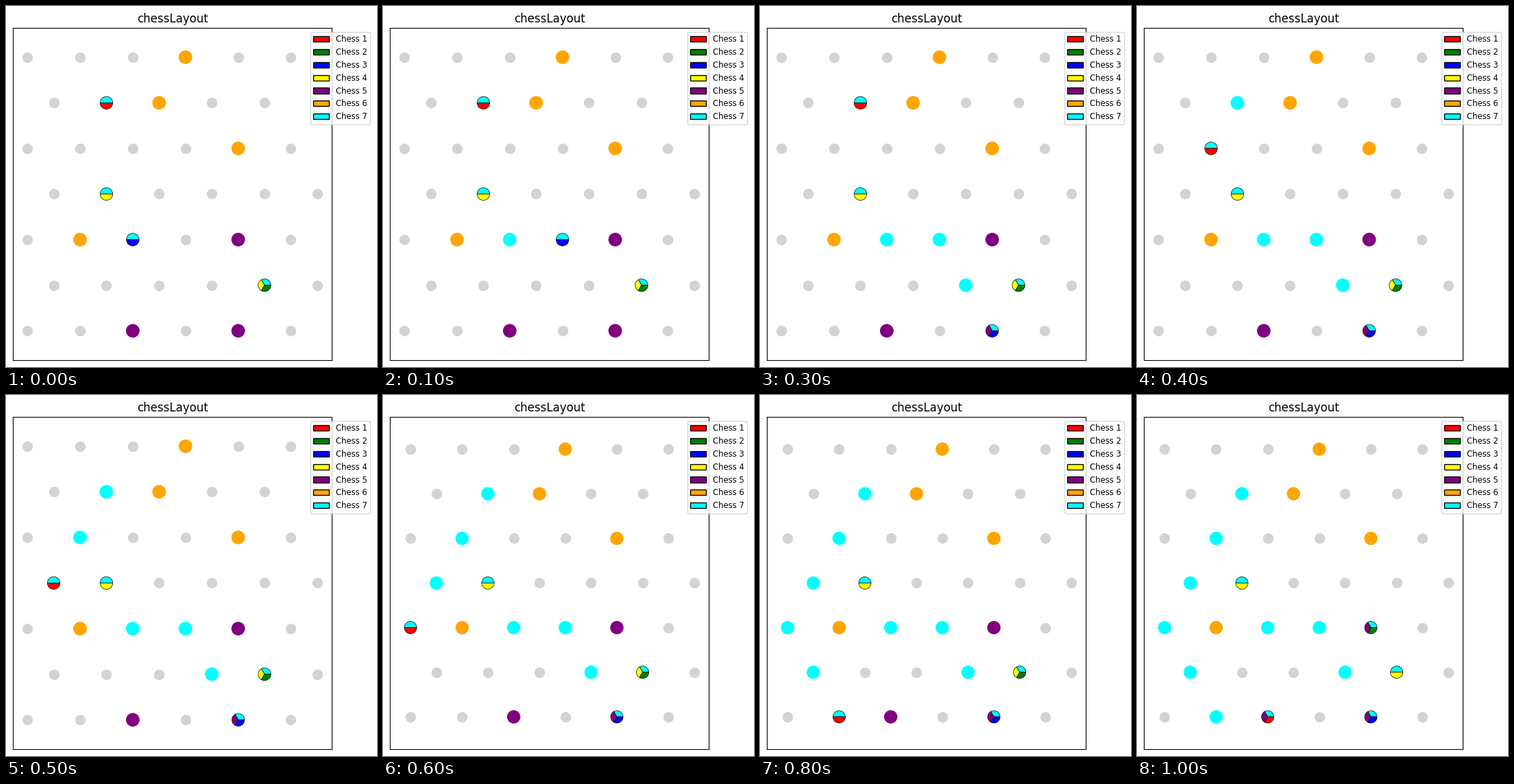
Recreate the animation shown at these times as a matplotlib script. Size 541x527 px, loop 1100 ms.

```python
import matplotlib.pyplot as plt
import numpy as np
from matplotlib.animation import FuncAnimation
from matplotlib.patches import Circle, Patch, Wedge

WIDTH, HEIGHT, DPI = 541, 527, 100
LEFT, BOTTOM, AX_W, AX_H = 10, 10.05, 465, 485
ROWS = COLS = 7
RADIUS = 0.12
COLORS = ["red", "green", "blue", "yellow", "purple", "orange", "cyan"]
TRAIL = len(COLORS)

# Starting cells as (column, row); odd rows sit half a column to the right.
START = {
    1: [(1.5, 1)],
    2: [(4.5, 5)],
    3: [(2, 4)],
    4: [(1.5, 3), (4.5, 5)],
    5: [(4, 4), (2, 6), (4, 6)],
    6: [(3, 0), (2.5, 1), (4, 2), (1, 4)],
}
HEADINGS = {"E": (1, 0), "SE": (0.5, 1), "SW": (-0.5, 1), "NW": (-0.5, -1)}
WALKS = [(3, "E SE SE"), (1, "SW SW SW SE SE E"), (2, "NW")]
STEPS = [(chess, HEADINGS[h]) for chess, walk in WALKS for h in walk.split()]


def to_xy(cell):
    col, row = cell
    return col, (ROWS // 2 - row) * np.sqrt(3) / 2


def layout(step):
    """Map each occupied cell to its chess ids, highest first."""
    pieces = {k: list(cells) for k, cells in START.items()}
    visited = {cell for k in range(1, 5) for cell in START[k]}
    for chess, (dx, dy) in STEPS[:step]:
        col, row = pieces[chess][0]
        pieces[chess] = [(col + dx, row + dy)]
        visited.add(pieces[chess][0])
    pieces[TRAIL] = visited

    cells = {}
    for chess in sorted(pieces, reverse=True):
        for cell in pieces[chess]:
            cells.setdefault(cell, []).append(chess)
    return cells


def cell_patches(cell, ids):
    xy = to_xy(cell)
    if len(ids) == 1:
        return [Circle(xy, RADIUS, color=COLORS[ids[0] - 1], zorder=3)]
    span = 360 / len(ids)
    return [
        Wedge(xy, RADIUS, i * span, (i + 1) * span, facecolor=COLORS[k - 1],
              edgecolor="black", linewidth=0.5, zorder=3)
        for i, k in enumerate(ids)
    ]


fig = plt.figure(figsize=(WIDTH / DPI, HEIGHT / DPI), dpi=DPI)
ax = fig.add_axes([LEFT / WIDTH, BOTTOM / HEIGHT, AX_W / WIDTH, AX_H / HEIGHT])
ax.set(xticks=[], yticks=[])
ax.set_title("chessLayout", fontsize=12)

grid = [to_xy((c + r % 2 / 2, r)) for r in range(ROWS) for c in range(COLS - 1)]
ax.plot(*zip(*grid), "o", color="lightgray", markersize=10)

handles = [Patch(facecolor=c, edgecolor="black", label=f"Chess {i}")
           for i, c in enumerate(COLORS, 1)]
ax.legend(handles=handles, loc="upper left", bbox_to_anchor=(0.92, 1), fontsize="small")

drawn = []


def draw(step):
    while drawn:
        drawn.pop().remove()
    cells = layout(step)
    for cell, ids in cells.items():
        drawn.extend(ax.add_patch(p) for p in cell_patches(cell, ids))

    # The view widens to hold any piece on the left border.
    left = min(0, min(col for col, _ in cells) - RADIUS)
    right = max(x for x, _ in grid)
    margin = 0.05 * (right - left)
    half = 0.55 * (right - left) * AX_H / AX_W
    ax.set_xlim(left - margin, right + margin)
    ax.set_ylim(-half, half)
    return drawn


anim = FuncAnimation(fig, draw, frames=len(STEPS) + 1, init_func=lambda: draw(0),
                     interval=100, repeat=True, repeat_delay=0)
plt.show()
```
